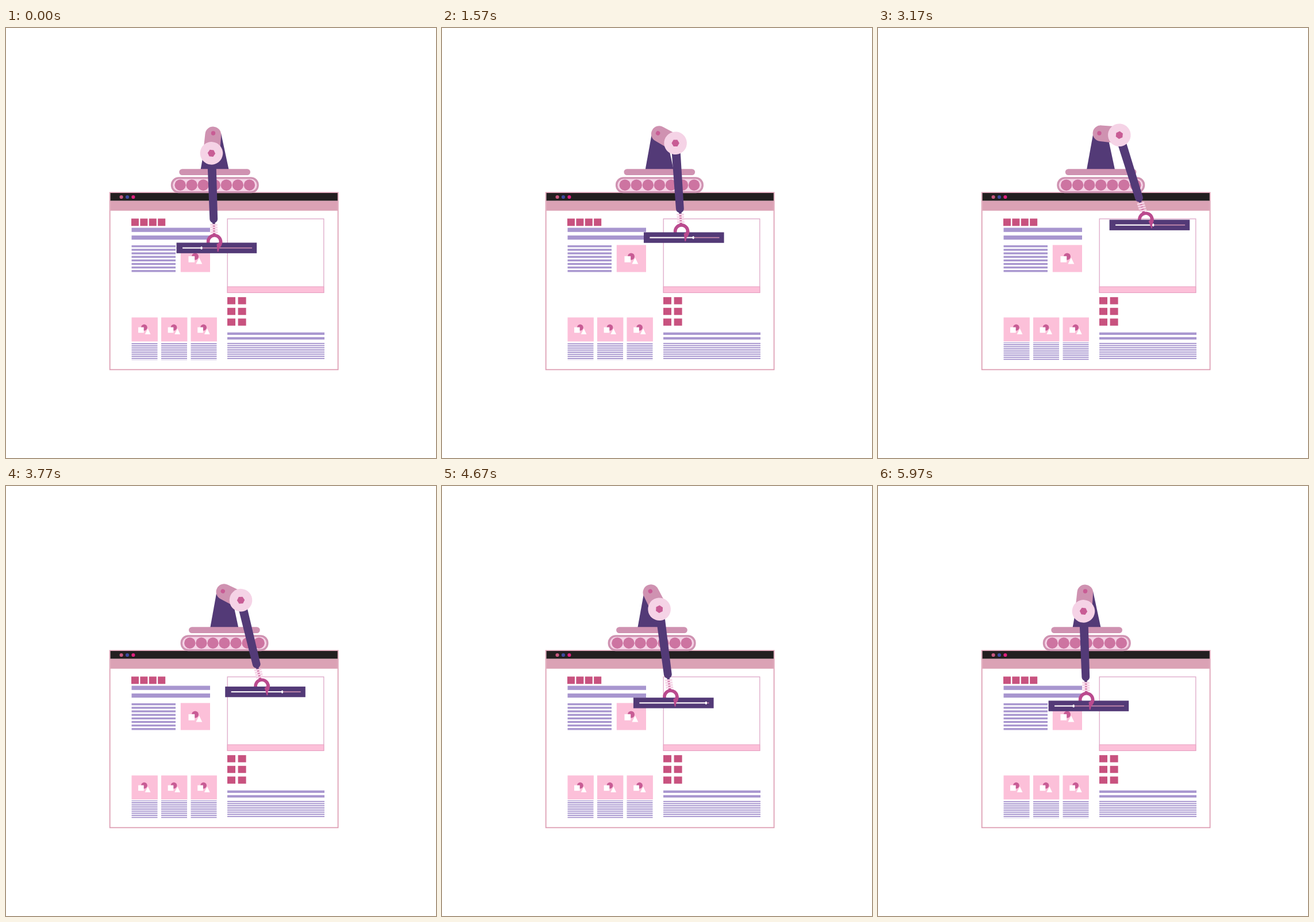
Write an HTML page that moves like this. It is 748 px wide and 748 px high and loops after 6000 ms.

```html
<!DOCTYPE html>
<html lang="en">
<head>
<meta charset="utf-8">
<title>Page building robot</title>
<style>
  html, body { margin: 0; width: 100%; height: 100%; overflow: hidden; background: #fff; }
  svg { display: block; width: 100vw; height: 100vh; }
</style>
</head>
<body>
<svg id="stage" viewBox="0 0 748 748"></svg>
<script>
const DARK = '#533a77', LILAC = '#a896cf', ROSE = '#c8527f', BLUSH = '#fcc0d9',
      PALE = '#f5d3e6', MAUVE = '#cf92b1', PLUM = '#c85c95', WHEEL = '#cd74a1', HOOK = '#ba4a8e';
const LOOP = 6000;
const SHOULDER = { x: 360.5, y: 183 }, UPPER = 35, REACH = 165;

// Progress 0..1 between two times along a cubic-bezier(lead, 0, 2/3, 1).
const ease = lead => (t, from, to) => {
  const u = Math.min(1, Math.max(0, (t - from) / (to - from)));
  let lo = 0, hi = 1;
  for (let i = 0; i < 24; i++) {
    const s = (lo + hi) / 2, w = 1 - s;
    if (3 * s * w * w * lead + 2 * s * s * w + s ** 3 < u) lo = s; else hi = s;
  }
  return lo * lo * (3 - 2 * lo);
};
const smooth = ease(1 / 3), quick = ease(1 / 6);

// Reach out, drive right while holding, stretch, then fold and drive back.
const pose = {
  base: t => 25 * (smooth(t, 1000, 2000) - smooth(t, 3000, 5000)),
  upper: t => -5 + 65.5 * smooth(t, 0, 1000) + 26.5 * quick(t, 2000, 3000) - 92 * quick(t, 3000, LOOP),
  fore: t => 3.1 + 2 * smooth(t, 0, 1000) + 13.9 * smooth(t, 2000, 3000) - 15.9 * quick(t, 3000, LOOP),
  knob: t => 43.5 + 36 * smooth(t, 0, 1000) + 11 * smooth(t, 1000, 2000) - 16 * smooth(t, 2000, 3000)
           + 52.5 * smooth(t, 3000, 4600) - 83.5 * smooth(t, 4600, LOOP),
  copy: t => 549.2 + 1.8 * (smooth(t, 1000, 3700) - smooth(t, 4670, LOOP))
};

const rect = (x, y, w, h, fill, extra = '') =>
  `<rect x="${x}" y="${y}" width="${w}" height="${h}" fill="${fill}" ${extra}/>`;
const disc = (x, y, r, fill) => `<circle cx="${x}" cy="${y}" r="${r}" fill="${fill}"/>`;
const path = (d, fill) => `<path d="${d}" fill="${fill}"/>`;
const times = (n, f) => Array.from({ length: n }, (_, i) => f(i)).join('');
const group = (id, body) => `<g id="${id}">${body}</g>`;

const lines = (n, x, y, w, h, pitch) => times(n, i => rect(x, y + i * pitch, w, h, LILAC));

const icon = (x, y, s) => `<g transform="translate(${x} ${y}) scale(${s})">` +
  disc(0, 0, 6, PLUM) + rect(-11.5, -.5, 10.7, 10.7, '#fff') +
  path('M7 2L12.3 13H1.5Z', '#fff') + '</g>';

const page =
  rect(180.7, 286.3, 396.9, 308, '#fff', 'stroke="#dea0b5" stroke-width="1.8"') +
  rect(181.6, 287, 395.2, 13.7, '#231f20') +
  rect(181.6, 300.6, 395.2, 17.2, '#dba2b5') +
  ['#c9587f', '#3d4a9f', '#e0217f'].map((c, i) => disc(200.6 + i * 10.4, 294, 3.1, c)).join('') +
  times(4, i => rect(218 + i * 15.4, 331.5, 13, 12.8, ROSE)) +
  lines(2, 218.5, 347.5, 136.5, 7.3, 13.4) +
  lines(8, 218.5, 378, 76.5, 3.4, 6.15) +
  rect(303.8, 377.5, 51.2, 47, BLUSH) + icon(329, 397.4, 1) +
  times(3, i => rect(218.5 + i * 51.5, 503.5, 45.4, 41.8, BLUSH) + icon(240.4 + i * 51.6, 521, .9)) +
  '<clipPath id="copyBox"><rect x="210" y="547" width="165" height="30.8"/></clipPath>' +
  '<g clip-path="url(#copyBox)">' +
  group('copy', times(3, i => lines(10, 218.5 + i * 51.5, -4.65, 45, 2, 3.65))) + '</g>' +
  rect(385.2, 332, 167.6, 128.4, 'none', 'stroke="#dba0c4" stroke-width="1.2"') +
  rect(385.2, 450, 167.6, 10.4, BLUSH, 'stroke="#e79fc0" stroke-width="1"') +
  times(6, i => rect(385 + i % 2 * 18.6, 468.2 + (i >> 1) * 18.6, 14, 12.4, ROSE)) +
  lines(2, 385, 529.6, 169, 4.2, 8.1) +
  lines(8, 385, 547.8, 169, 2, 3.72);

const base =
  path('M350 183H374L387.5 246H338.6Z', DARK) +
  rect(301.3, 245.2, 123.7, 10.8, MAUVE, 'rx="5.4"') +
  rect(286.8, 259.2, 153, 28, MAUVE, 'rx="13.5"') +
  rect(290.2, 262.6, 146.2, 21.4, PALE, 'rx="10.5"') +
  times(7, i => disc(303.1 + i * 20.05, 273.2, 9.7, WHEEL));

const upper =
  path('M-13.9 2.5A13.9 13.9 0 0 1 13.9 2.5L14.5 35H-14.5Z', MAUVE) + disc(0, 0, 3.7, PLUM);

const forearm =
  path('M-7.6 5H7.6L6.9 114.5A6.9 6.9 0 0 1 -6.9 114.5Z', DARK) +
  rect(-2.2, 119, 4.4, 5, DARK) +
  rect(-2, 123, 4, 18, PLUM) +
  times(4, i => path(`M-6.3 ${122.8 + i * 4.3}l12.6 .8v2.9l-12.6 -.8Z`, PALE)) +
  rect(-2.2, 139.4, 4.4, 3, HOOK) +
  `<circle cx="0" cy="154" r="11" fill="none" stroke="${HOOK}" stroke-width="5.6"/>`;

const slider =
  rect(-69.8, -9.2, 139.6, 18.4, DARK) +
  rect(-59.3, -.8, 121, 1.6, MAUVE) +
  '<rect id="played" x="-59.3" y="-1" height="2" fill="#fff"/>' +
  '<ellipse id="knob" rx="1.7" ry="2.6" fill="#fff"/>';

const tail = path('M13.8 154C13.6 160 10.5 164 8 165.5L6.4 171.5H4.6L3.8 158Q7.6 157.5 8.2 154Z', HOOK);

const hexagon = times(6, i => {
  const a = i * Math.PI / 3;
  return `${(6.7 * Math.cos(a)).toFixed(2)},${(6.7 * Math.sin(a)).toFixed(2)} `;
});
const joint = disc(0, 0, 19.8, PALE) + `<polygon points="${hexagon}" fill="${PLUM}"/>`;

document.getElementById('stage').innerHTML = page + group('base', base) + group('upper', upper) +
  group('forearm', forearm) + group('slider', slider) + group('tail', tail) + group('joint', joint);

const el = id => document.getElementById(id);
const place = (id, x, y, turn = 0) =>
  el(id).setAttribute('transform', `translate(${x} ${y}) rotate(${turn})`);

// The point a given length from (x, y), angle in degrees from straight down.
const swing = (x, y, length, angle) => {
  const a = angle * Math.PI / 180;
  return [x + length * Math.sin(a), y + length * Math.cos(a)];
};

function draw(t) {
  const shift = pose.base(t), a = pose.upper(t), b = pose.fore(t), knob = pose.knob(t);
  const sx = SHOULDER.x + shift;
  const elbow = swing(sx, SHOULDER.y, UPPER, a);
  place('base', shift, 0);
  place('upper', sx, SHOULDER.y, -a);
  place('joint', ...elbow, -a);
  place('forearm', ...elbow, 1.2 - b);
  place('tail', ...elbow, 1.2 - b);
  place('slider', ...swing(...elbow, REACH, b));
  el('played').setAttribute('width', knob - 10.5);
  el('knob').setAttribute('cx', knob - 69.8);
  place('copy', 0, pose.copy(t));
}

const start = performance.now();
function tick() {
  draw((performance.now() - start) % LOOP);
  requestAnimationFrame(tick);
}
tick();
</script>
</body>
</html>
```
